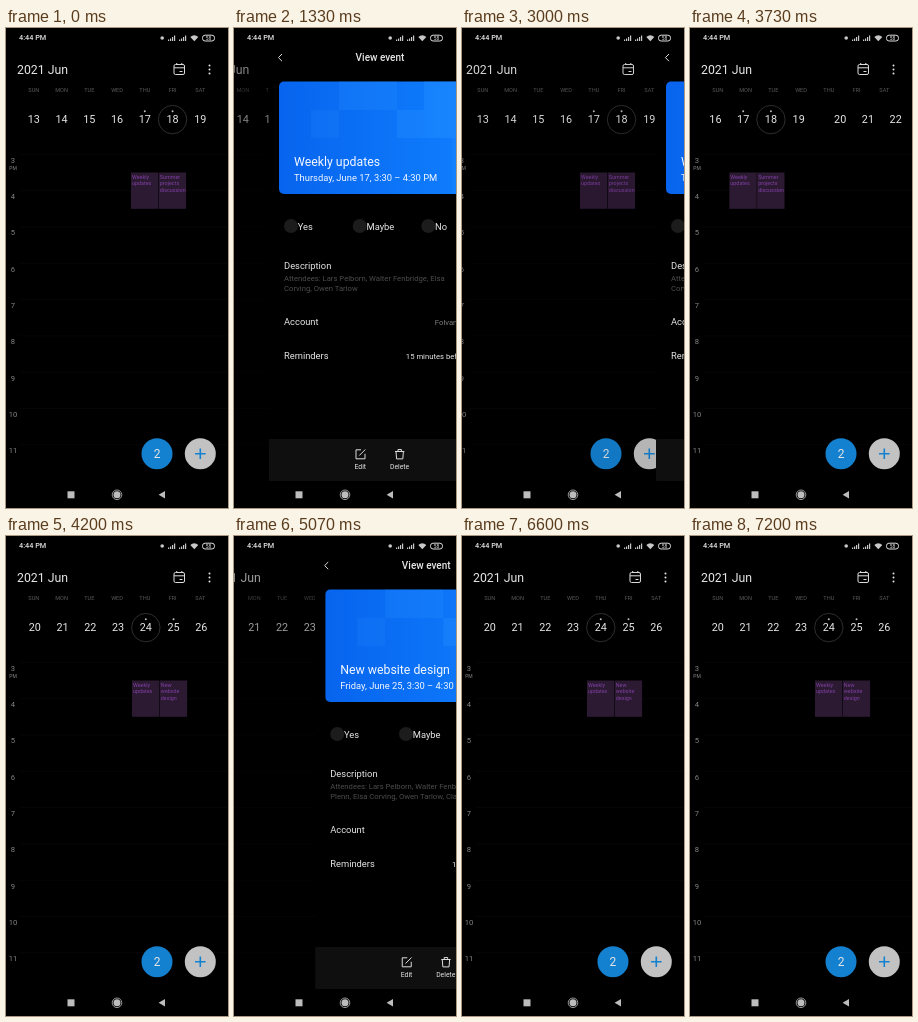
These frames come from a looping animation (222 by 480 pixels, 7.47 s). An HTML page:

```html
<!DOCTYPE html>
<html lang="en">
<head>
<meta charset="utf-8">
<title>Calendar</title>
<style>
html, body { margin: 0; width: 100%; height: 100%; overflow: hidden; background: #000; }
svg { display: block; width: 100vw; height: 100vh; font-family: Roboto, "Open Sans", sans-serif; fill: #e6e6e6; }
.mid { text-anchor: middle; }
.end { text-anchor: end; }
.line { fill: none; stroke: #dcdcdc; stroke-width: 1; }
.label { font-size: 9.35px; }
.note { font-size: 7.7px; }
</style>
</head>
<body>
<svg viewBox="0 0 222 480">
  <defs>
    <clipPath id="weekClip"><rect x="14" y="70" width="208" height="383"/></clipPath>
    <clipPath id="cardClip"><rect x="10" y="53.5" width="202" height="112.5" rx="5"/></clipPath>
    <linearGradient id="blue"><stop stop-color="#0764ee"/><stop offset="1" stop-color="#1080ff"/></linearGradient>
  </defs>

  <g id="calendar">
    <text x="11" y="45.5" font-size="12.3">2021 Jun</text>
    <g class="line">
      <rect x="168" y="36.5" width="10.5" height="10" rx="1.5"/>
      <path d="M168 39.8h10.5M170.7 35v2M175.8 35v2M173.5 43.5h3"/>
    </g>
    <circle cx="203.5" cy="37.5" r="1"/><circle cx="203.5" cy="41.5" r="1"/><circle cx="203.5" cy="45.5" r="1"/>
    <g id="weekdays" class="mid" font-size="5.6" fill="#5a5a5a"></g>
    <g id="hours" class="mid" font-size="7.6" fill="#858585"></g>
    <g clip-path="url(#weekClip)"><g id="week0"></g><g id="week1"></g></g>
    <circle cx="151" cy="425.7" r="15.5" fill="#1481d0"/>
    <text class="mid" x="151" y="430" font-size="12">2</text>
    <circle cx="194.3" cy="425.7" r="15.5" fill="#c2c2c2"/>
    <path d="M189 425.7h10.6M194.3 420.4v10.6" stroke="#1481d0" stroke-width="1.6"/>
  </g>

  <g id="event">
    <rect y="18" width="222" height="435" fill="#000"/>
    <path class="line" d="M13 26l-3.6 3.6 3.6 3.6"/>
    <text class="mid" x="111" y="33" font-size="10" font-weight="500">View event</text>
    <g clip-path="url(#cardClip)">
      <rect x="10" y="53" width="202" height="114" fill="url(#blue)"/>
      <g fill="#2a93ff">
        <rect x="155" y="53" width="57" height="57" opacity=".35"/>
        <rect x="128" y="82" width="27" height="28" opacity=".3"/>
        <rect x="70" y="53" width="58" height="29" opacity=".22"/>
        <rect x="42" y="82" width="28" height="28" opacity=".14"/>
        <rect x="183" y="110" width="29" height="57" opacity=".2"/>
      </g>
    </g>
    <text id="name" x="25" y="137.5" font-size="12.3" fill="#f4f8ff"></text>
    <text id="date" x="25" y="153.3" font-size="9.4" fill="#f4f8ff"></text>
    <g id="answers" class="label"></g>
    <g class="label">
      <text x="15" y="241">Description</text>
      <text x="15" y="297">Account</text>
      <text x="15" y="331.3">Reminders</text>
    </g>
    <g class="note">
      <text id="people0" x="15" y="253.3" fill="#4c4c4c"></text>
      <text id="people1" x="15" y="262.5" fill="#4c4c4c"></text>
      <text class="end" x="197" y="296.5" fill="#7c7c7c">Folvan37</text>
      <text class="end" x="199" y="330.7">15 minutes before</text>
    </g>
    <circle cx="205.3" cy="293.3" r="2.8" fill="#7547ae"/>
    <path class="line" d="M204.3 324.8l3 3.1-3 3.1"/>
    <rect y="411" width="222" height="42" fill="#0f0f0f"/>
    <path class="line" d="M92 421.8h-5v9h9v-5M90.3 427.5l6-6M126 423.5h9.4M129 423.3v-1.8h3.4v1.8M127 423.5l.6 7.4h6.2l.6-7.4"/>
    <text class="mid" x="91.3" y="441" font-size="6.8">Edit</text>
    <text class="mid" x="130.5" y="441" font-size="6.8">Delete</text>
  </g>

  <rect width="222" height="18"/>
  <rect width="222" height="18" fill="#000"/>
  <text x="13" y="12.4" font-size="7.3" font-weight="500">4:44 PM</text>
  <g fill="#c8c8c8">
    <circle cx="156.2" cy="10" r="1.8"/>
    <path id="bars" d="M162 13v-1.5h1.2v1.5zM164 13v-2.6h1.2v2.6zM166 13v-4h1.2v4zM168 13v-5.4h1.2v5.4z"/>
    <use href="#bars" x="11"/>
    <path d="M184.3 9q4-3.6 8 0l-4 4.3z"/>
  </g>
  <rect class="line" x="196.5" y="7.2" width="12" height="5.8" rx="2.6" stroke-width=".8"/>
  <text class="mid" x="202.5" y="11.9" font-size="4.8">58</text>

  <rect y="453" width="222" height="27" fill="#000"/>
  <g fill="#bdbdbd">
    <rect x="61.5" y="463.3" width="7" height="7"/>
    <circle cx="111" cy="466.8" r="3.5"/>
    <circle cx="111" cy="466.8" r="4.8" fill="none" stroke="#bdbdbd" stroke-width=".8"/>
    <path d="M159 463v7.6l-6.4-3.8z"/>
  </g>
</svg>
<script>
const LOOP = 7470, WIDTH = 222, WEEK = 208;
const $ = id => document.getElementById(id);
const text = (x, y, s, more = '') => `<text x="${x}" y="${y}" ${more}>${s}</text>`;
const dayX = i => 27.8 + 27.75 * i;

$('weekdays').innerHTML = ['SUN', 'MON', 'TUE', 'WED', 'THU', 'FRI', 'SAT']
  .map((d, i) => text(dayX(i), 64.3, d)).join('');

let hours = text(7, 142, 'PM', 'font-size="5"');
for (let i = 0; i < 9; i++) {
  const y = 126.4 + 36.3 * i;
  hours += `<path d="M14 ${y}H222" stroke="#090909" stroke-width=".7"/>` + text(7, y + 8.4, i + 3);
}
$('hours').innerHTML = hours;

$('answers').innerHTML = [['Yes', 22], ['Maybe', 90.7], ['No', 159.3]]
  .map(([s, x]) => `<circle cx="${x}" cy="198" r="7" fill="#1c1c1c"/>` + text(x + 6.8, 201.5, s)).join('');

function week(first, ring, blocks) {
  let s = `<circle cx="${dayX(ring)}" cy="91.6" r="14.2" fill="none" stroke="#3a3a3a" stroke-width=".8"/>`;
  for (let i = 0; i < 7; i++) s += text(dayX(i), 95.3, first + i, 'class="mid" font-size="10.8"');
  blocks.forEach((words, i) => {
    const x = 125 + 27.8 * i;
    s += `<circle cx="${dayX(i + 4)}" cy="83.3" r="1" fill="#bbb"/>` +
      `<rect x="${x}" y="144.5" width="27.3" height="36.3" fill="#2c1a33"/>`;
    words.split(' ').forEach((w, n) => {
      s += text(x + 1, 150.8 + 6.6 * n, w, 'font-size="5.4" fill="#8140a4"');
    });
  });
  return s;
}
$('week0').innerHTML = week(13, 5, ['Weekly updates', 'Summer projects discussion']);
$('week1').innerHTML = week(20, 4, ['Weekly updates', 'New website design']);

const events = [{
  name: 'Weekly updates',
  date: 'Thursday, June 17, 3:30 – 4:30 PM',
  people0: 'Attendees: Lars Pelborn, Walter Fenbridge, Elsa',
  people1: 'Corving, Owen Tarlow'
}, {
  name: 'New website design',
  date: 'Friday, June 25, 3:30 – 4:30 PM',
  people0: 'Attendees: Lars Pelborn, Walter Fenbridge, Hugh',
  people1: 'Plenn, Elsa Corving, Owen Tarlow, Clara Vosk'
}];

// Critically damped spring from 0 to 1
function spring(ms, tau) {
  const x = Math.max(0, ms) / tau;
  return 1 - (1 + x) * Math.exp(-x);
}
const visit = (t, open, close) => t < close ? spring(t - open, 52) : 1 - spring(t - close, 52);
const shift = (id, x) => $(id).setAttribute('transform', `translate(${x.toFixed(2)})`);

let shown;
function draw(now) {
  const t = now % LOOP;
  const current = events[t < 4000 ? 0 : 1];
  if (current !== shown) {
    for (const key in current) $(key).textContent = current[key];
    shown = current;
  }
  const e = t < 4000 ? visit(t, 1158, 2813) : visit(t, 4958, 6065);
  shift('calendar', -WIDTH * e / 4);
  $('calendar').setAttribute('opacity', 1 - e / 2);
  shift('event', WIDTH * (1 - e));
  $('event').setAttribute('visibility', e > 0.001 ? 'visible' : 'hidden');

  const swipe = t > 4500 ? 1 : spring(t - 3620, 78);
  shift('week0', -WEEK * swipe);
  shift('week1', WEEK * (1 - swipe));
}

let start;
function tick(now) {
  start ??= now;
  draw(now - start);
  requestAnimationFrame(tick);
}
draw(0);
requestAnimationFrame(tick);
</script>
</body>
</html>
```
